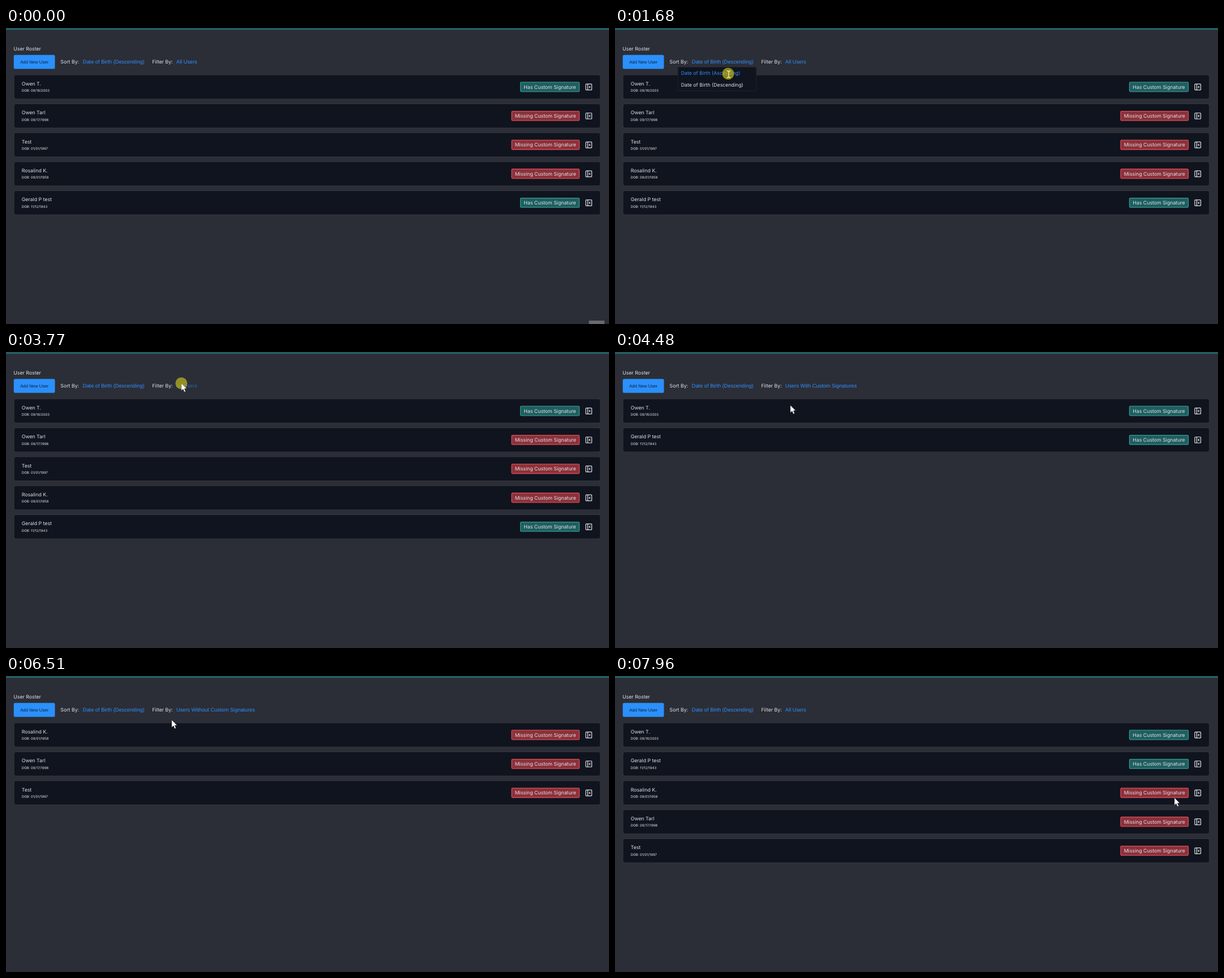
An HTML page that plays this animation: 1066x525 px, repeating every 8 s.

```html
<!DOCTYPE html>
<html lang="en">
<head>
<meta charset="utf-8">
<title>User Roster</title>
<style>
  html, body { margin: 0; width: 100%; height: 100%; overflow: hidden; background: #2b2e37; }
  svg { display: block; width: 100%; height: 100%; }
  text { font: 8.75px Inter, sans-serif; fill: #dfe1e5; text-rendering: geometricPrecision; white-space: pre; }
  .small { font-size: 6px; fill: #e8e9ec; }
  .link { font: 9.24px "Liberation Sans", Arial, sans-serif; fill: #2f8fff; }
  .button { font: 7.75px "Liberation Sans", Arial, sans-serif; fill: #10213c; text-anchor: middle; }
  .badge { text-anchor: middle; }
  .card { fill: #10141f; stroke: #36373c; }
  .menu rect { fill: #10141f; stroke: #20232d; }
  .menu .hover { fill: #2f8fff; }
  .has { fill: #205e60; stroke: #309a8d; stroke-width: 1.3; }
  .missing { fill: #8b313b; stroke: #d94d52; stroke-width: 1.3; }
  .icon { fill: none; stroke: #e4e6ea; stroke-width: 1.2; }
</style>
</head>
<body>
<svg viewBox="0 0 1066 525">
  <rect width="1066" height="525" fill="#2b2e37"/>
  <rect width="1066" height="2.6" fill="#1d5b5e"/>
  <rect y="2" width="1066" height="1" fill="#2b7573"/>
  <text x="13.3" y="39.8">User Roster</text>
  <rect x="13.7" y="47.8" width="72.8" height="24.8" rx="2.5" fill="#2b90fb"/>
  <text class="button" x="50.2" y="62.9">Add New User</text>
  <text x="96.3" y="62.8">Sort By:</text>
  <text class="link" id="sortLink" x="135.8" y="62.8"></text>
  <g id="filter">
    <text x="258.4" y="62.8">Filter By:</text>
    <text class="link" id="filterLink" x="301" y="62.8"></text>
  </g>
  <g id="rows"></g>
  <g id="menus"></g>
  <rect id="hint" x="1030.5" y="519" width="27.5" height="6" fill="#686a70"/>
  <g id="cursor">
    <circle id="click" r="10.5" fill="#b5ae1c" opacity=".76"/>
    <path id="arrow" d="M0 0V13L3.1 10.2L5.2 15.3L7.4 14.4L5.3 9.4H9.3Z" fill="#fff" stroke="#22242b" stroke-width=".4"/>
    <path id="beam" d="M-2.2 -5Q0 -5 1 -4Q2 -5 4.2 -5M1 -4V6M-2.2 7Q0 7 1 6Q2 7 4.2 7" fill="none" stroke="#f4f0a4" stroke-width="1.3"/>
  </g>
</svg>
<script>
const LOOP = 8000, STEP = 70, PRESS = 68;
const ROW_TOP = 82.8, ROW_PITCH = 51.35;
const ITEM_TOP = 69.5, ITEM_PITCH = 20.7;
const $ = id => document.getElementById(id);

// In stored order: filtering returns to it, sorting goes by year of birth.
const users = [
  { name: "Owen T.", born: "09/18/2003", signed: true },
  { name: "Gerald P test", born: "11/12/1943", signed: true },
  { name: "Rosalind K.", born: "09/01/1958", signed: false },
  { name: "Owen Tarl", born: "09/17/1998", signed: false },
  { name: "Test", born: "01/01/1997", signed: false }
];
const sorts = ["Date of Birth (Ascending)", "Date of Birth (Descending)"];
const filters = ["All Users", "Users With Custom Signatures", "Users Without Custom Signatures"];
const keeps = [() => true, user => user.signed, user => !user.signed];

// Stops of the pointer: "open" presses a link, "pick" a menu item, the rest only pass by.
const stops = [
  { at: 390, x: 991, y: 486 },
  { at: 1220, x: 188, y: 59.5, open: "sort" },
  { at: 1680, x: 200, y: 81, pick: 0, dwell: 200, press: 130 },
  { at: 2286, x: 185, y: 57.5, open: "sort" },
  { at: 3090, x: 184, y: 91, pick: 1, dwell: 330 },
  { at: 3770, x: 310, y: 55.5, open: "filter" },
  { at: 4350, x: 310, y: 94.5, pick: 1, dwell: 140 },
  { at: 4962, x: 313, y: 58.5, open: "filter" },
  { at: 5394, x: 315.7, y: 116, pick: 2 },
  { at: 5960, x: 602, y: 91 },
  { at: 6510, x: 293, y: 78 },
  { at: 6860, x: 318, y: 60.5, open: "filter" },
  { at: 7268, x: 324, y: 79, pick: 0 },
  { at: 7610, x: 352, y: 89 },
  { at: 7890, x: 989, y: 216 }
];

// Longer ways take longer, and each move starts just in time to arrive.
stops.forEach((stop, i) => {
  const from = stops[i - 1] ?? stop;
  stop.acts = "open" in stop || "pick" in stop;
  stop.done = stop.at + (stop.press ?? PRESS);
  stop.arrive = stop.at - (stop.dwell ?? (stop.acts ? PRESS : 0));
  const travel = Math.min(760, 100 + 4 * Math.hypot(stop.x - from.x, stop.y - from.y));
  stop.leave = Math.max(from.at + (from.acts ? 2 * PRESS : 0), stop.arrive - travel);
});

function add(parent, tag, attrs, text = "") {
  const node = document.createElementNS("http://www.w3.org/2000/svg", tag);
  for (const key in attrs) node.setAttribute(key, attrs[key]);
  node.textContent = text;
  return parent.appendChild(node);
}

function makeRow({ name, born, signed }) {
  const row = add($("rows"), "g", {});
  const width = signed ? 104 : 119.5;
  add(row, "rect", { class: "card", x: 14, y: .3, width: 1036.8, height: 42.8, rx: 3.5 });
  add(row, "text", { x: 27.7, y: 19.2 }, name);
  add(row, "text", { class: "small", x: 27.8, y: 30.6 }, "DOB: " + born);
  add(row, "rect", { class: signed ? "has" : "missing", x: 1013.5 - width, y: 13.4, width, height: 16.6, rx: 1.5 });
  add(row, "text", { class: "badge", x: 1013.5 - width / 2, y: 24.9 }, (signed ? "Has" : "Missing") + " Custom Signature");
  add(row, "rect", { class: "icon", x: 1025, y: 16.6, width: 10.5, height: 10.5, rx: 1 });
  add(row, "path", { class: "icon", d: "M1028.5 16.6v10.5M1033 19.9l-2 1.95l2 1.95" });
  return row;
}

function makeMenu(x, width, labels) {
  const menu = add($("menus"), "g", { class: "menu" });
  add(menu, "rect", { x, y: ITEM_TOP, width, height: labels.length * ITEM_PITCH + .6, rx: 1 });
  const items = labels.map((label, i) =>
    add(menu, "text", { x: x + 5.6, y: 83 + i * ITEM_PITCH }, label));
  return { menu, items };
}

const rows = users.map(makeRow);
const sortMenu = makeMenu(111.2, 138.6, sorts);
const filterMenu = makeMenu(263, 156.6, filters);

const show = (node, on) => { node.style.display = on ? "" : "none"; };
const year = user => +user.born.slice(-4);
const sorted = (list, descending) =>
  [...list].sort((a, b) => (year(a) - year(b)) * (descending ? -1 : 1));

function stateAt(t) {
  const state = { open: "", sort: 1, filter: 0, list: sorted(users, 1) };
  for (const { done, open, pick } of stops.filter(stop => stop.acts && stop.done <= t)) {
    if (!open) {
      state[state.open] = pick;
      state.list = state.open === "sort" ? sorted(state.list, pick) : users.filter(keeps[pick]);
    }
    state.open = open ?? "";
  }
  return state;
}

function pointerAt(t) {
  const held = t - t % STEP;
  const i = Math.max(1, stops.findLastIndex(stop => stop.leave <= held));
  const from = stops[i - 1], to = stops[i];
  const u = Math.min(1, Math.max(0, (held - to.leave) / (to.arrive - to.leave)));
  const k = u * u * (3 - 2 * u);
  return [from.x + (to.x - from.x) * k, from.y + (to.y - from.y) * k];
}

function drawMenu({ menu, items }, open, hovered, shift) {
  show(menu, open);
  menu.setAttribute("transform", `translate(${shift})`);
  items.forEach((item, i) => item.classList.toggle("hover", i === hovered));
}

function drawLink(link, label, over) {
  link.textContent = label;
  link.style.opacity = over ? .55 : 1;
}

function draw(t) {
  const { open, sort, filter, list } = stateAt(t);
  const [x, y] = pointerAt(t);
  const shift = sort ? 0 : -5.6;
  const onLink = y > 54 && y < 66;
  const hovered = Math.floor((y - ITEM_TOP) / ITEM_PITCH);

  rows.forEach((row, i) => {
    const place = list.indexOf(users[i]);
    show(row, place >= 0);
    row.setAttribute("transform", `translate(0 ${ROW_TOP + place * ROW_PITCH})`);
  });
  drawLink($("sortLink"), sorts[sort], onLink && x < 245);
  drawLink($("filterLink"), filters[filter], onLink && x > 301);
  $("filter").setAttribute("transform", `translate(${shift})`);
  drawMenu(sortMenu, open === "sort", hovered, shift);
  drawMenu(filterMenu, open === "filter", hovered, 0);

  const beam = open === "sort" && hovered === 0;
  show($("hint"), t < 70);
  show($("cursor"), t >= stops[0].at);
  show($("click"), stops.some(stop => stop.acts && t >= stop.at && t < stop.done));
  show($("arrow"), !beam);
  show($("beam"), beam);
  $("cursor").setAttribute("transform", `translate(${x} ${y})`);
}

const began = performance.now();
function tick() {
  draw((performance.now() - began) % LOOP);
  requestAnimationFrame(tick);
}
tick();
</script>
</body>
</html>
```
